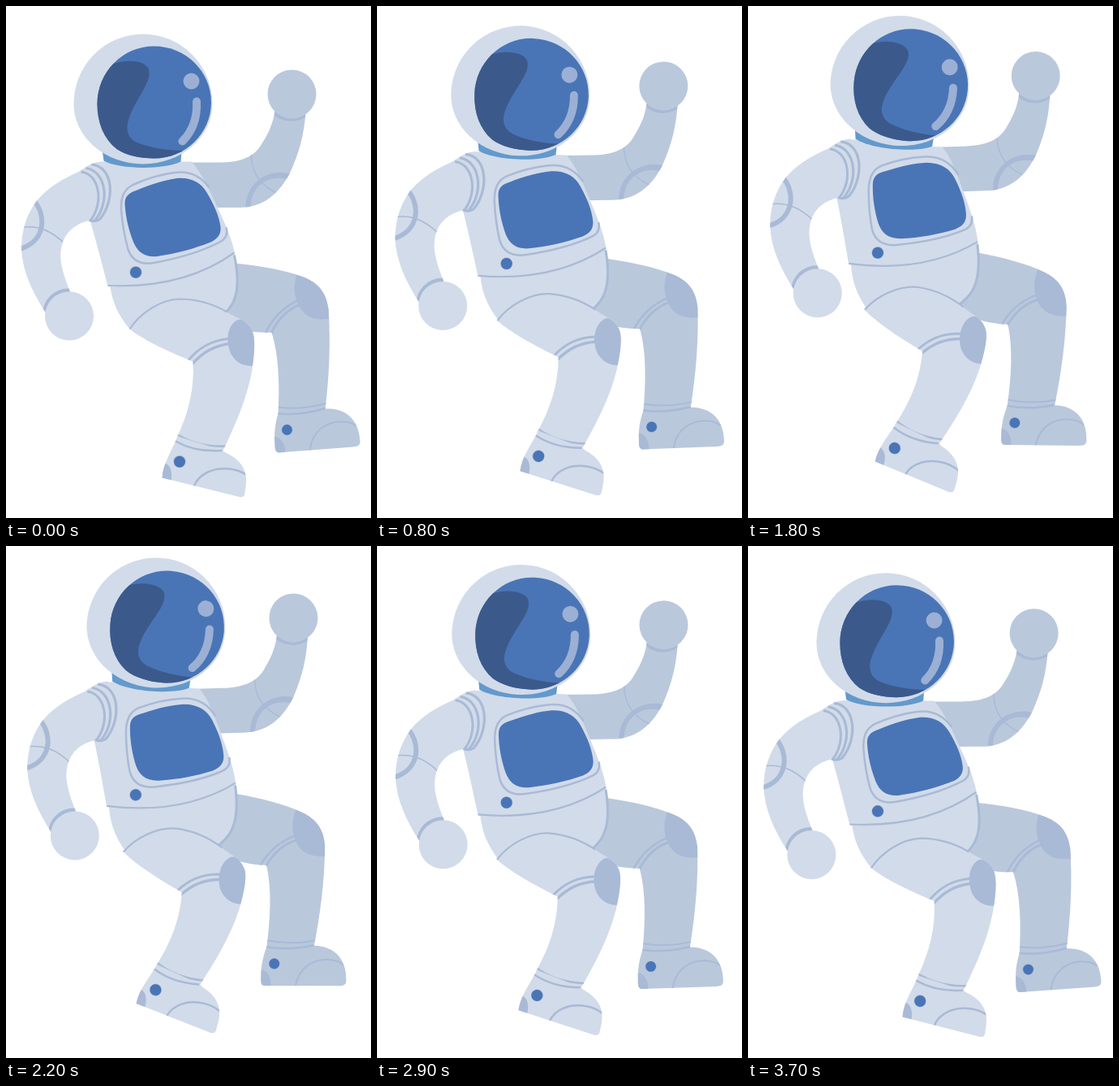
Recreate the animation shown at these times as an HTML page with a canvas. Size 450 by 630 pixels, loop 3800 ms.

```html
<!DOCTYPE html>
<html lang="en">
<head>
<meta charset="utf-8">
<title>Floating astronaut</title>
<style>
html, body { margin: 0; width: 100%; height: 100%; overflow: hidden; background: #fff; }
canvas { display: block; width: 450px; height: 630px; }
</style>
</head>
<body>
<canvas id="stage"></canvas>
<script>
const W = 450, H = 630, LOOP = 3800, STEP = 100;
const LIGHT = '#d2dbe9', SHADE = '#bac8dc', LINE = '#a9bad6',
      BLUE = '#4975b6', DARK = '#3b5a8b', NECK = '#6399cc', GLARE = '#9bb0d4';

const canvas = document.getElementById('stage');
const ctx = canvas.getContext('2d');
const dpr = window.devicePixelRatio || 1;
canvas.width = W * dpr;
canvas.height = H * dpr;

function fill(d, color) {
  ctx.fillStyle = color;
  ctx.fill(new Path2D(d));
}

function line(d, width, color = LINE, cap = 'butt') {
  ctx.strokeStyle = color;
  ctx.lineWidth = width;
  ctx.lineCap = cap;
  ctx.stroke(new Path2D(d));
}

function disc(x, y, r, color) {
  ctx.fillStyle = color;
  ctx.beginPath();
  ctx.arc(x, y, r, 0, Math.PI * 2);
  ctx.fill();
}

function button(x, y, r) {
  disc(x, y, r + 0.6, LINE);
  disc(x, y, r, BLUE);
}

// Fills a shape, then draws its details clipped to it.
function part(d, color, details) {
  fill(d, color);
  ctx.save();
  ctx.clip(new Path2D(d));
  details();
  ctx.restore();
}

function turned(deg, x, y, draw) {
  ctx.save();
  ctx.translate(x, y);
  ctx.rotate(deg * Math.PI / 180);
  ctx.translate(-x, -y);
  draw();
  ctx.restore();
}

function backArm() {
  part('M222,192 L262,192 C285,192 303,187 313,172 C322,158 328,147 331,129 L369,130 C367,158 361,180 349.5,205 C337,229 318,247.5 287,247.5 L235,247.5 Z', SHADE, () => {
    line('M302,182 C302,206 315,222 336,231', 1.4);
    fill('M295,249 C294,220 320,198 351,206 L347,213 C322,206 301,222 301,249 Z', LINE);
    disc(351, 109.5, 32, LINE);
  });
  disc(352, 108, 30, SHADE);
}

function backLeg() {
  part('M270,315 L285,316.5 C310,319 343,324 366,333 C384,340 394,351 397,372 C400,412 398,455 393,497 L335,503 C337,465 336,430 327,401 C310,402 292,400 265,392 Z', SHADE, () => {
    line('M319,403 C328,383 342,370 359,362', 2.5);
    line('M326,403 C335,384 346,373 362,367', 3);
    fill('M358,330 C378,333 396,343 400,384 C378,388 365,380 359,365 C354,354 354,342 358,330 Z', LINE);
    line('M333,493 C355,496 375,494 396,488', 2);
  });
  part('M335,501 C331,515 330,525 331,538 C331,545 332,549 336,549 L428,542 C434,541 436,540 436,535 C435,513 423,496 398,495 L393,495 Z', SHADE, () => {
    fill('M329,529 C340,530 344,540 344,550 L329,550 Z', LINE);
    line('M374,547 C376,525 392,510 415,511 C422,511 427,513 431,516', 2);
  });
  line('M335,501 C355,503 375,500 393,494.5', 2.5);
  button(346, 521, 6.4);
}

function torso() {
  fill('M117,191 L228,191 C240,203 250,225 260,247 C270,268 279,288 282,307 C287,330 286,350 281,363 C277,371 271,378 262,386 C230,400 180,400 152,397 C138,380 131,365 128,345 L125,344 C119,321 111,290 103,263 L103,200 Z', LIGHT);
  line('M281,306 C286,330 286,350 280,363 C277,370 271,377 262,385', 3);
  line('M125,343.5 C180,346 235,336 281,303', 2.2);
  line('M250,223 C240,209 225,202 207,204.5 C188,207 170,213 155,220 C144,226 141,236 141.5,250 C143,268 146,285 150,299 C155,313 165,318.5 182,315.5 C212,310 240,302 263,290 C271,286 273,280 271,272', 2.5);
  fill('M160,226.5 C178,219 195,213.5 210,211.5 C228,210 240,217 247,229 C256,244 262,257 264,271 C265,281 260,286 252,290 C232,298 210,304 186,307.5 C170,309 162,302 157,291 C151,276 147,260 146,243 C146,234 150,230 160,226.5 Z', BLUE);
  button(159.5, 327.2, 7);
}

function head() {
  fill('M118.5,179 L120,190 C140,201 195,201 215,191 L216,179 Z', NECK);
  fill('M83,120 A85.5,86 0 0 1 254,120 A85.5,74 0 0 1 83,120 Z', LIGHT);
  part('M182,49 C221,49 252.5,80 252.5,118 C252.5,156 221,187 182,187 C165,187 148,183.5 136,175.5 C120,163 112,143 112,120 C112,81 143,49 182,49 Z', BLUE, () => {
    fill('M130,71 C150,64 170,67 175,76 C181,92 161,110 151,138 C146,153 150,164 165,169 C185,176 205,178 228,177 L205,200 L100,200 L100,71 Z', DARK);
  });
  disc(228, 92, 10, GLARE);
  line('M234.5,117 C235.5,137 230,153 217,166', 10, GLARE, 'round');
}

function frontLeg() {
  part('M152,397 C165,377 190,361 213,360 C240,360 258,368 272,376 C284,384 297,386 303,399 C308,410 305,433 303,447 C296,485 282,515 266,549 L210,531 C225,499 232,470 230,437 C200,425 168,410 152,397 Z', LIGHT, () => {
    line('M224,436 C237,420 252,411 274,409', 3);
    line('M229,440 C243,425 255,418 275,415', 3.5);
    fill('M284,386 C294,383 304,390 308,404 L308,442 C292,444 283,438 277,428 C271,416 270,395 284,386 Z', LINE);
    line('M208,525 C228,538 248,542 270,541', 2.5);
  });
  line('M152,397 C165,377 190,361 213,360 C240,360 258,368 272,376', 2.2);
  part('M211,529 C204,547 193,562 192,580 L285,603 C291,605 294,603 294,598 C298,578 296,561 270,549 L266,546 Z', LIGHT, () => {
    fill('M190,561 C202,561 205,572 203,584 L190,582 Z', LINE);
    line('M231,591 C237,575 255,567 275,569 C284,570 291,573 297,577', 2.5);
  });
  line('M208.5,535 C226,545 246,548 266,546.5', 2.5);
  button(213.5, 560.2, 7);
}

function frontArm() {
  part('M117,191 C105,191 95,200 88,204 C70,212 52,222 37.5,239 C25,256 18.5,275 18.5,298 C19.5,325 31,350 49,378 L79,352 C70,330 64,312 68,295 C72,278 84,267 104,263 C112,266 128,250 128,230 C128,210 125,195 117,191 Z', LIGHT, () => {
    line('M33,238 C50,256 49,290 15,299', 6);
    line('M17,272 C38,269 55,275 73,293', 1.6);
    disc(76.5, 379, 32, LINE);
  });
  line('M92,203.5 C114,206 121,240 104,263', 3);
  line('M98,199 C122,202 129,240 109,263.5', 3.2);
  line('M105,194.5 C133,197 134,240 115,262 C111,265 105,264 102,263', 3.2);
  disc(77.5, 381, 30, LIGHT);
}

function draw(p) {
  ctx.setTransform(dpr, 0, 0, dpr, 0, 0);
  ctx.fillStyle = '#fff';
  ctx.fillRect(0, 0, W, H);
  ctx.translate(0.5, 0.5);
  turned(5.28 * p, 435, 314.5, () => {
    turned(-7.1 * p, 219, 249, backArm);
    backLeg();
    torso();
    head();
    turned(3.6 * p, 128, 357, frontLeg);
    turned(-4.95 * p, 110, 230, frontArm);
  });
}

function tick() {
  const t = Math.floor(performance.now() % LOOP / STEP) * STEP;
  draw(1 - Math.abs(1 - t / (LOOP / 2)));
  requestAnimationFrame(tick);
}
tick();
</script>
</body>
</html>
```
